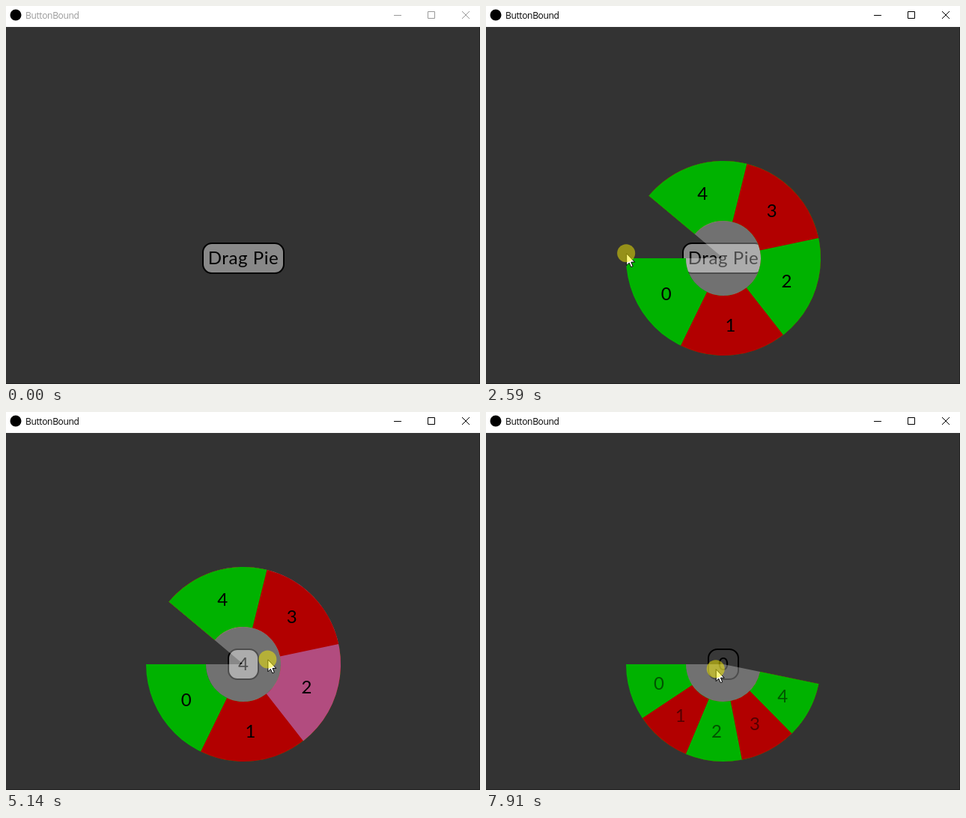
Recreate the animation shown at these times as an HTML page with a canvas. Size 633 by 505 pixels, loop 7.99 s.

```html
<!DOCTYPE html>
<html lang="en">
<head>
<meta charset="utf-8">
<title>ButtonBound</title>
<style>
html, body { margin: 0; width: 100%; height: 100%; overflow: hidden; background: #333; }
canvas { display: block; }
</style>
</head>
<body>
<canvas width="633" height="505"></canvas>
<script>
const ctx = document.querySelector('canvas').getContext('2d');
const LOOP = 7990, FADE = 230, FOCUS = 560, ENTER = 70;
const CX = 317, CY = 337, OUTER = 130, INNER = 50, FULL = 320, SLICES = 5;

// While the button is held the pie is open; the slice under the pointer becomes the button text.
const drags = [
  { open: 755, release: 3010, text: 'Drag Pie' },
  { open: 3450, release: 4260, text: '4' },
  { open: 4680, release: 5560, text: '3' },
  { open: 5960, release: 7141, text: '0' },
  { open: 7790, release: LOOP, text: '0' }
];

// Pointer stops around the pie centre: time, angle, distance
const stops = [
  [ENTER, 111, 136], [600, 150, 17], [1360, 150, 20], [2590, 717, 130], [2800, 735, 100],
  [3010, 715, 100], [3400, 703, 24], [3600, 703, 24], [3910, 650, 78], [4640, 640, 5],
  [5140, 551.5, 33], [5340, 577, 86], [5950, 480, 10], [6370, 394, 41], [7120, 390, 70],
  [7700, 391, 12], [LOOP, 391, 12]
];

const clamp = v => Math.max(0, Math.min(1, v));
const smooth = k => k * k * (3 - 2 * k);
const rad = deg => Math.PI - deg * Math.PI / 180;
const polar = (deg, r) => [CX + r * Math.cos(rad(deg)), CY + r * Math.sin(rad(deg))];

function pointerAt(t) {
  const i = stops.findIndex(s => s[0] > t);
  const [t0, a0, r0] = stops[i - 1], [t1, a1, r1] = stops[i];
  const k = smooth((t - t0) / (t1 - t0));
  const angle = a0 + (a1 - a0) * k;
  const [x, y] = polar(angle, r0 + (r1 - r0) * k);
  return { x, y, slice: Math.floor(angle % 360 / (FULL / SLICES)) };
}

function label(text, x, y, color) {
  ctx.font = '24px Lato, sans-serif';
  ctx.letterSpacing = text.length > 1 ? '0.6px' : '0px';
  ctx.textAlign = 'center';
  ctx.fillStyle = color;
  ctx.fillText(text, x, y + 8);
}

function disc(x, y, r, color) {
  ctx.beginPath();
  ctx.arc(x, y, r, 0, 7);
  ctx.fillStyle = color;
  ctx.fill();
}

function drawWindow(active) {
  ctx.fillStyle = '#fff';
  ctx.fillRect(0, 0, 633, 28);
  ctx.fillStyle = '#222';
  ctx.fillRect(0, 28, 633, 477);
  ctx.fillStyle = '#333';
  ctx.fillRect(0, 28, 632, 476);
  disc(13, 12, 7.5, '#000');

  ctx.font = '12px "Open Sans", sans-serif';
  ctx.letterSpacing = '-0.35px';
  ctx.textAlign = 'left';
  ctx.fillStyle = ctx.strokeStyle = active ? '#000' : '#999';
  ctx.fillText('ButtonBound', 26, 17);
  ctx.lineWidth = 1;
  ctx.stroke(new Path2D('M518 12.5h10M563.5 7.5h9v9h-9zM609 7l10 10m0-10l-10 10'));
}

function drawButton(text, half, down) {
  ctx.beginPath();
  ctx.roundRect(CX - half + 1, CY - 20, 2 * half - 2, 40, 12);
  ctx.fillStyle = down ? '#383838' : '#888';
  ctx.fill();
  ctx.lineWidth = 2;
  ctx.strokeStyle = '#000';
  ctx.stroke();
  label(text, CX, CY, '#000');
}

function drawPie(progress, hot) {
  const sweep = FULL * progress, step = sweep / SLICES, end = rad(sweep);
  // Each slice runs on under the next one, so no seam shows between them.
  for (let i = 0; i < SLICES; i++) {
    const from = rad(i * step);
    ctx.beginPath();
    ctx.arc(CX, CY, OUTER, from, end, true);
    ctx.arc(CX, CY, INNER, end, from);
    ctx.fillStyle = i === hot ? '#b24c7f' : i % 2 ? '#b20000' : '#00b200';
    ctx.fill();
  }
  ctx.beginPath();
  ctx.moveTo(CX, CY);
  ctx.arc(CX, CY, INNER, rad(0), end, true);
  ctx.fillStyle = 'rgba(255,255,255,.3)';
  ctx.fill();
  for (let i = 0; i < SLICES; i++)
    label(String(i), ...polar((i + 0.5) * step, (OUTER + INNER) / 2), `rgba(0,0,0,${progress})`);
}

const arrow = new Path2D('M.5.5v16l3.5-3.5 2.5 5.5 2.5-1-2.3-5.5h4.8z');

function drawPointer({ x, y }) {
  ctx.save();
  ctx.translate(x, y);
  ctx.fillStyle = '#fff';
  ctx.fill(arrow);
  ctx.lineWidth = 1;
  ctx.strokeStyle = '#000';
  ctx.stroke(arrow);
  disc(0, 0, 12, 'rgba(250,240,0,.5)');
  ctx.restore();
}

function draw(t) {
  drawWindow(t >= FOCUS);
  const pointer = t >= ENTER && pointerAt(t);
  const drag = drags.findLast(d => t >= d.open);
  const held = drag && t < drag.release;
  const text = drags.findLast(d => t >= d.release)?.text ?? 'Drag Pie';
  const half = text.length > 1 ? 55 : 21;
  const over = held && Math.abs(pointer.x - CX) < half && Math.abs(pointer.y - CY) < 21;
  drawButton(text, half, over);

  if (drag) {
    const opened = clamp((t - drag.open) / FADE);
    const progress = held ? opened : 1 - clamp((t - drag.release) / FADE);
    if (progress > 0) drawPie(progress, held && opened === 1 ? pointer.slice : -1);
  }
  if (pointer) drawPointer(pointer);
}

const start = performance.now();
function tick() {
  draw((performance.now() - start) % LOOP);
  requestAnimationFrame(tick);
}
tick();
</script>
</body>
</html>
```
